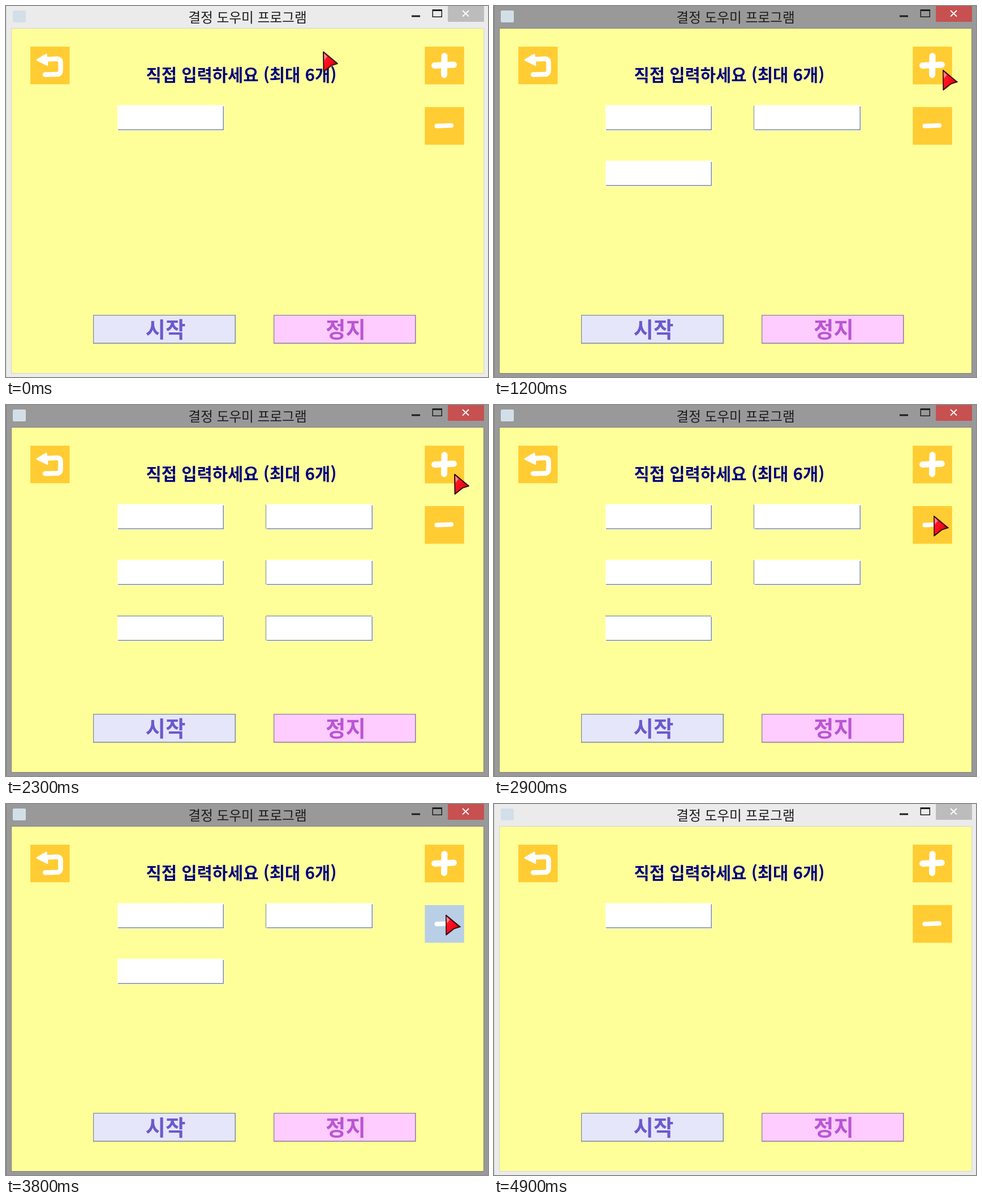
Write an HTML page that moves like this. It is 852x657 px and loops after 5 s.

```html
<!DOCTYPE html>
<html lang="ko">
<head>
<meta charset="utf-8">
<title>결정 도우미 프로그램</title>
<style>
html, body { margin: 0; width: 100%; height: 100%; overflow: hidden; }
svg { display: block; width: 100vw; height: 100vh; }
text { font-family: "Noto Sans CJK KR", "Noto Sans CJK", "Noto Sans CJK JP", sans-serif; text-anchor: middle; }
.bold { font-weight: 700; }
.chrome, .edge, .close, .plus, .minus, .field, .cursor {
  animation: 5s step-end infinite;
}
.chrome { fill: #ebebeb; animation-name: chrome; }
.edge { fill: #d4d4d4; animation-name: edge; }
.close { fill: #bcbcbc; animation-name: close; }
.tile { fill: #ffcc33; }
.plus { fill: #ffcc33; animation-name: plus; }
.minus { fill: #ffcc33; animation-name: minus; }
.cursor { animation-name: move; }
.icon { fill: none; stroke: #fff; stroke-linecap: round; stroke-linejoin: round; }
.line { fill: #7a8a99; }
.field { opacity: 0; }
.n2 { animation-name: n2; }
.n3 { animation-name: n3; }
.n4 { animation-name: n4; }
.n5 { animation-name: n5; }
.n6 { animation-name: n6; }

/* 1% = 50 ms */
@keyframes chrome { 14% { fill: #999; } 98% { fill: #ebebeb; } }
@keyframes edge { 14% { fill: #808080; } 98% { fill: #d4d4d4; } }
@keyframes close { 14% { fill: #c75050; } 98% { fill: #bcbcbc; } }
@keyframes plus {
  14%, 22%, 28%, 34% { fill: #b8cfe5; }
  16%, 24%, 30%, 36% { fill: #ffcc33; }
}
@keyframes minus {
  56%, 62%, 76%, 82% { fill: #b8cfe5; }
  58%, 64%, 78%, 84% { fill: #ffcc33; }
}
@keyframes n2 { 16% { opacity: 1; } 84% { opacity: 0; } }
@keyframes n3 { 24% { opacity: 1; } 78% { opacity: 0; } }
@keyframes n4 { 30% { opacity: 1; } 70% { opacity: 0; } }
@keyframes n5 { 36% { opacity: 1; } 64% { opacity: 0; } }
@keyframes n6 { 44% { opacity: 1; } 58% { opacity: 0; } }
@keyframes move {
  0% { transform: translate(560px, 80.5px); }
  2% { transform: translate(632px, 91px); }
  4% { transform: translate(738px, 105px); }
  6% { transform: translate(792.5px, 113px); }
  46% { transform: translate(792px, 122px); }
  48% { transform: translate(788px, 143px); }
  50% { transform: translate(783px, 167px); }
  52% { transform: translate(779px, 187px); }
  54% { transform: translate(776.5px, 196px); }
  88% { transform: translate(660px, 158px); }
  90% { transform: translate(350px, 75px); }
  92% { transform: translate(51px, 0); opacity: 1; }
  94%, 100% { transform: translate(51px, -50px); opacity: 0; }
}
</style>
</head>
<body>
<svg viewBox="0 0 852 657" preserveAspectRatio="none">
  <defs>
    <linearGradient id="red" x1="0" y1="0" x2="1" y2="0.6">
      <stop offset="0" stop-color="#ff7a80"/>
      <stop offset="0.3" stop-color="#ff1426"/>
      <stop offset="0.7" stop-color="#f00818"/>
      <stop offset="1" stop-color="#a8000c"/>
    </linearGradient>
    <g id="box">
      <path fill="#fff" d="M0 0h189v45.500H0z"/>
      <path class="line" d="M186.500 2h1.500v42.500H1V43h185.500z"/>
    </g>
    <path id="left" class="line" d="M0 1h1v43H0z"/>
    <path id="top" class="line" d="M0 0h187v1.200H0z"/>
  </defs>

  <rect class="chrome" width="852" height="657"/>
  <rect class="edge" width="1" height="657"/>
  <rect class="edge" x="9" y="39" width="836" height="612"/>
  <rect x="10" y="40" width="834" height="610" fill="#ffff99"/>

  <rect x="12" y="8" width="23" height="21" rx="2" fill="#d3dfe8"/>
  <text x="427" y="28.500" font-size="23.700" fill="#1c1c1c">결정 도우미 프로그램</text>
  <path fill="#1c1c1c" d="M717 16.500h15v3h-15z"/>
  <path fill="#1c1c1c" fill-rule="evenodd" d="M753.500 6h17.500v14h-17.500zM755 9v9.500h14.500V9z"/>
  <rect class="close" x="781" width="64" height="28"/>
  <path d="M807 8l11 10.500M818 8l-11 10.500" stroke="#fff" stroke-width="1.800"/>

  <rect class="tile" x="43" y="72" width="69.500" height="66.500"/>
  <path class="icon" stroke-width="8.500" d="M70 94.500L90 93.500Q96.500 93.500 96.500 100V114Q96.500 121 90 121L69 121.500"/>
  <path class="icon" stroke-width="3" style="fill:#fff" d="M55 95.500L71 86L73 104.500z"/>

  <rect class="plus" x="740.300" y="72" width="69.500" height="66.700"/>
  <path class="icon" stroke-width="11" d="M775 88.500L774.500 122M757.500 105.500L791.500 104"/>
  <rect class="minus" x="740.300" y="179" width="69.500" height="66.700"/>
  <path class="icon" stroke-width="8" d="M761.500 212.500L787 211.500"/>

  <text class="bold" x="416" y="132.500" font-size="29.600" fill="#000080">직접 입력하세요 (최대 6개)</text>

  <use href="#box" x="197" y="175.500"/>
  <g class="field n2"><use href="#box" x="460" y="175.500"/><use href="#left" x="459" y="175.500"/></g>
  <g class="field n3"><use href="#box" x="197" y="274"/></g>
  <g class="field n4"><use href="#box" x="460" y="274"/><use href="#left" x="459" y="274"/></g>
  <g class="field n5"><use href="#box" x="197" y="373"/><use href="#top" x="197" y="373"/></g>
  <g class="field n6"><use href="#box" x="460" y="373"/><use href="#left" x="459" y="373"/><use href="#top" x="460" y="373"/></g>

  <rect x="154" y="547" width="252" height="51" fill="#7a8a99"/>
  <rect x="155.200" y="548.200" width="249.300" height="48.300" fill="#e6e6fa"/>
  <text class="bold" x="282" y="586.500" font-size="38.500" fill="#6a5acd">시작</text>
  <rect x="473" y="547" width="251.500" height="51" fill="#8a7a9f"/>
  <rect x="474.200" y="548.200" width="248.800" height="48.300" fill="#ffccff"/>
  <text class="bold" x="600.500" y="586.500" font-size="38.500" fill="#ba55d3">정지</text>

  <g class="cursor">
    <path fill="url(#red)" stroke="#200004" stroke-width="1.800" stroke-linejoin="round" d="M1 .8L26 21.500L15 25L1.500 35.800z"/>
    <path fill="#ffb0b4" opacity=".7" d="M2.500 4L8 9L3 15z"/>
  </g>
</svg>
</body>
</html>
```
